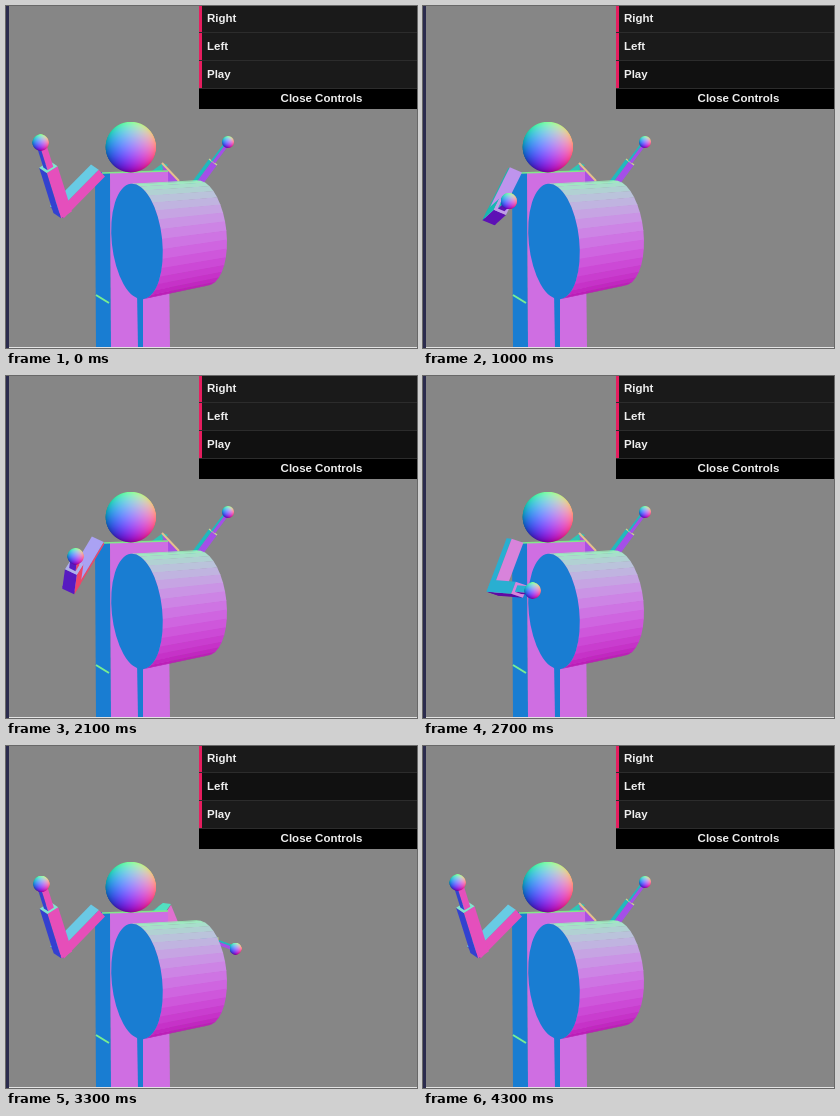
An HTML page with a canvas for the animation above (4800 ms loop, 411x342 px).

```html
<!DOCTYPE html>
<html lang="en">
<head>
<meta charset="utf-8">
<title>Drummer</title>
<style>
html, body { margin: 0; width: 100%; height: 100%; overflow: hidden; background: #868686; }
canvas { display: block; }
</style>
</head>
<body>
<canvas id="stage" width="411" height="342"></canvas>
<script>
const ctx = document.getElementById('stage').getContext('2d');
const LOOP = 4800, STEP = 100;

// Vector helpers; x is right, y is up, z points to the viewer.
const add = (a, b, s = 1) => a.map((v, i) => v + b[i] * s);
const scale = (a, s) => a.map(v => v * s);
const dot = (a, b) => a.reduce((sum, v, i) => sum + v * b[i], 0);
const cross = (a, b) => [
  a[1] * b[2] - a[2] * b[1],
  a[2] * b[0] - a[0] * b[2],
  a[0] * b[1] - a[1] * b[0]
];
function rotate(v, axis, angle) {
  const c = Math.cos(angle), s = Math.sin(angle);
  return add(add(scale(v, c), cross(axis, v), s), axis, dot(axis, v) * (1 - c));
}
const normalColor = n => `rgb(${scale(n, 1 / Math.hypot(...n)).map(v => Math.round(127.5 + 127.5 * v))})`;

const VIEW = [0.4, 0.08, 1];
const SHOULDER = [92, 164.5];
const project = p => [
  SHOULDER[0] + p[0] - VIEW[0] * p[2],
  SHOULDER[1] - p[1] + VIEW[1] * p[2]
];

function poly(points, color) {
  ctx.beginPath();
  points.forEach(p => ctx.lineTo(p[0], p[1]));
  ctx.closePath();
  ctx.fillStyle = color;
  ctx.fill();
}
function line(a, b, color, width = 1.5) {
  ctx.beginPath();
  ctx.moveTo(...a);
  ctx.lineTo(...b);
  ctx.strokeStyle = color;
  ctx.lineWidth = width;
  ctx.stroke();
}
function rect(x, y, w, h, color) {
  ctx.fillStyle = color;
  ctx.fillRect(x, y, w, h);
}

// Ball shaded by its surface normals, painted once at double size.
function makeBall(radius) {
  const sprite = document.createElement('canvas');
  const size = sprite.width = sprite.height = Math.ceil(radius * 4);
  const g = sprite.getContext('2d');
  g.arc(size / 2, size / 2, radius * 2, 0, Math.PI * 2);
  g.clip();
  for (let j = 0; j < size; j++) {
    for (let i = 0; i < size; i++) {
      const x = (i + 0.5 - size / 2) / (radius * 2);
      const y = (size / 2 - j - 0.5) / (radius * 2);
      const z = Math.sqrt(Math.max(0, 1 - x * x - y * y));
      g.fillStyle = normalColor([0.98 * x + 0.2 * z, y + 0.05 * z, 0.98 * z - 0.2 * x]);
      g.fillRect(i, j, 1, 1);
    }
  }
  return (x, y) => ctx.drawImage(sprite, x - size / 4, y - size / 4, size / 2, size / 2);
}
const head = makeBall(25.3), nearBall = makeBall(8.2), farBall = makeBall(6);

// Stroke positions as [time, lift]: 0 is raised, 1 touches the drum.
const NEAR = [[500, 0], [900, 1], [1000, .75], [1200, .06], [1400, .88], [1500, .88],
  [1600, .6], [1700, .16], [1800, .4], [2000, 1], [2100, .57], [2200, .3], [2400, .95],
  [2500, .08], [2700, 1], [2900, .08], [3000, .8], [3100, .95], [3300, .02],
  [3500, .8], [3600, 1], [3800, .2], [4000, 1], [4100, .8], [4300, 0]];
const FAR = [[3000, 0], [3300, .95], [3400, .6], [3600, .1], [3800, .95], [4100, 0]];

function sample(keys, t) {
  if (t <= keys[0][0]) return keys[0][1];
  for (let i = 1; i < keys.length; i++) {
    const [t0, v0] = keys[i - 1], [t1, v1] = keys[i];
    if (t <= t1) return v0 + (v1 - v0) * (t - t0) / (t1 - t0);
  }
  return keys[keys.length - 1][1];
}

function box(start, dir, length, side, front, half) {
  const end = add(start, dir, length);
  const drawFace = (normal, center, u, v) => {
    if (dot(normal, VIEW) <= 0) return;
    const corners = [[-1, -1], [1, -1], [1, 1], [-1, 1]]
      .map(([a, b]) => project(add(add(center, u, a), v, b)));
    poly(corners, normalColor(normal));
  };
  const middle = add(start, dir, length / 2), along = scale(dir, length / 2);
  const s = scale(side, half), f = scale(front, half);
  for (const sign of [-1, 1]) {
    drawFace(scale(side, sign), add(middle, s, sign), along, f);
    drawFace(scale(front, sign), add(middle, f, sign), along, s);
    drawFace(scale(dir, sign), sign > 0 ? end : start, s, f);
  }
}

function drawNearArm(lift) {
  const axis = [0.535, 0.843, -0.05], swing = lift * 68 * Math.PI / 180;
  const upper = rotate([-0.576, -0.713, 0.4], axis, swing);
  const front = rotate([-0.186, 0.589, 0.786], axis, swing);
  const side = cross(upper, front);
  const bend = (1 - lift) * 19 * Math.PI / 180;
  const fore = add(scale(front, Math.cos(bend)), upper, -Math.sin(bend));
  const back = cross(side, fore);
  const elbow = scale(upper, 50);
  box([0, 0, 0], upper, 56, side, front, 6.3);
  box(add(elbow, fore, -6), fore, 61, side, back, 6.3);
  box(add(elbow, fore, 55), fore, 30, side, back, 3.4);
  nearBall(...project(add(elbow, fore, 88)));
}

const curve = (a, b, c, t) => a.map((v, i) =>
  v * (1 - t) * (1 - t) + b[i] * 2 * t * (1 - t) + c[i] * t * t);

function limb(a, b, width) {
  const dx = b[0] - a[0], dy = b[1] - a[1], len = Math.hypot(dx, dy);
  const at = (p, o) => [p[0] - dy / len * o, p[1] + dx / len * o];
  const h = width / 2, split = -h * 0.25;
  poly([at(a, -h), at(b, -h), at(b, split), at(a, split)], '#20b9bd');
  poly([at(a, split), at(b, split), at(b, h), at(a, h)], '#a44fe8');
  line(at(b, -h), at(b, h), '#c9d98c', 1.2);
}

function drawFarArm(lift) {
  const elbow = curve([187, 183], [196, 190], [195, 198], lift);
  const wrist = curve([207, 156], [222, 172], [211, 199], lift);
  const tip = curve([222, 136], [244, 172], [228, 206], lift);
  poly([[146, 165], [157, 157], [162, 159], [154, 166]], '#2ec5b5');
  if (lift < 0.4) {
    poly([[156, 159], [174, 176], [170, 180], [161, 176]], '#a94fe4');
    line([156, 157], [173, 175], '#e5c08c', 2);
  } else {
    poly([[153, 160], [157, 157], [165, 158], [160, 165], [148, 165]], '#52e0c0');
    poly([[165, 159], [172, 176], [162, 178], [161, 165]], '#e070cf');
  }
  limb(elbow, wrist, 10);
  limb(wrist, tip, 5);
  farBall(...tip);
}

const BLUE = '#197dd2', PINK = '#cf6ee2';

function drawBody() {
  poly([[89, 166], [104, 166], [105, 342], [90, 342]], BLUE);
  poly([[104, 167], [162, 165], [164, 342], [105, 342]], PINK);
  poly([[131, 285], [137, 285], [137, 342], [132, 342]], BLUE);
  line([96, 167], [162, 165], '#83e889', 1.5);
  line([90, 289], [103, 297], '#78ee91', 2);
}

function drawDrum() {
  const tilt = -0.105;
  const rim = (cx, cy, rx, ry, a) => {
    const x = rx * Math.cos(a), y = ry * Math.sin(a);
    return [cx + x * Math.cos(tilt) - y * Math.sin(tilt), cy + x * Math.sin(tilt) + y * Math.cos(tilt)];
  };
  const face = a => rim(131, 235.5, 25.2, 58, a);
  const rear = a => rim(196, 227, 24.5, 53, a);
  const bands = 18, outward = [0.62, -0.14, 0.77], up = [-0.1, 0.98, 0.1];
  for (let i = 0; i < bands; i++) {
    const a = (i / bands - 0.5) * Math.PI, b = a + Math.PI / bands + 0.012;
    const turn = (70 - 127 * (i + 0.5) / bands) * Math.PI / 180;
    const normal = add(scale(outward, Math.cos(turn)), up, Math.sin(turn));
    poly([face(a), rear(a), rear(b), face(b)], normalColor(normal));
  }
  ctx.beginPath();
  ctx.ellipse(131, 235.5, 25.2, 58, tilt, 0, Math.PI * 2);
  ctx.fillStyle = BLUE;
  ctx.fill();
}

function drawPanel(t) {
  const hovered = t < 100 ? '' : t < 2800 ? 'Play' : 'Left';
  ctx.font = 'bold 11.5px "Liberation Sans", Arial, sans-serif';
  ctx.textAlign = 'left';
  ['Right', 'Left', 'Play'].forEach((label, i) => {
    const y = i * 28 - 1;
    rect(193, y, 218, 28, label === hovered ? '#111' : '#1a1a1a');
    rect(193, y + 27, 218, 1, '#2c2c2c');
    rect(193, y, 3, 27, '#e61d5f');
    ctx.fillStyle = '#eee';
    ctx.fillText(label, 201, y + 17);
  });
  rect(193, 83, 218, 20, '#000');
  ctx.fillStyle = '#eee';
  ctx.textAlign = 'center';
  ctx.fillText('Close Controls', 315.5, 96);
}

function draw(now) {
  const t = Math.floor((now % LOOP) / STEP) * STEP;
  rect(0, 0, 411, 342, '#868686');
  rect(0, 0, 3, 342, '#2b2b4d');
  drawFarArm(sample(FAR, t));
  drawBody();
  head(124.8, 141);
  drawDrum();
  drawNearArm(sample(NEAR, t));
  rect(3, 341, 408, 1, '#e4e4e4');
  drawPanel(t);
}

const begin = performance.now();
function tick() {
  draw(performance.now() - begin);
  requestAnimationFrame(tick);
}
tick();
</script>
</body>
</html>
```
